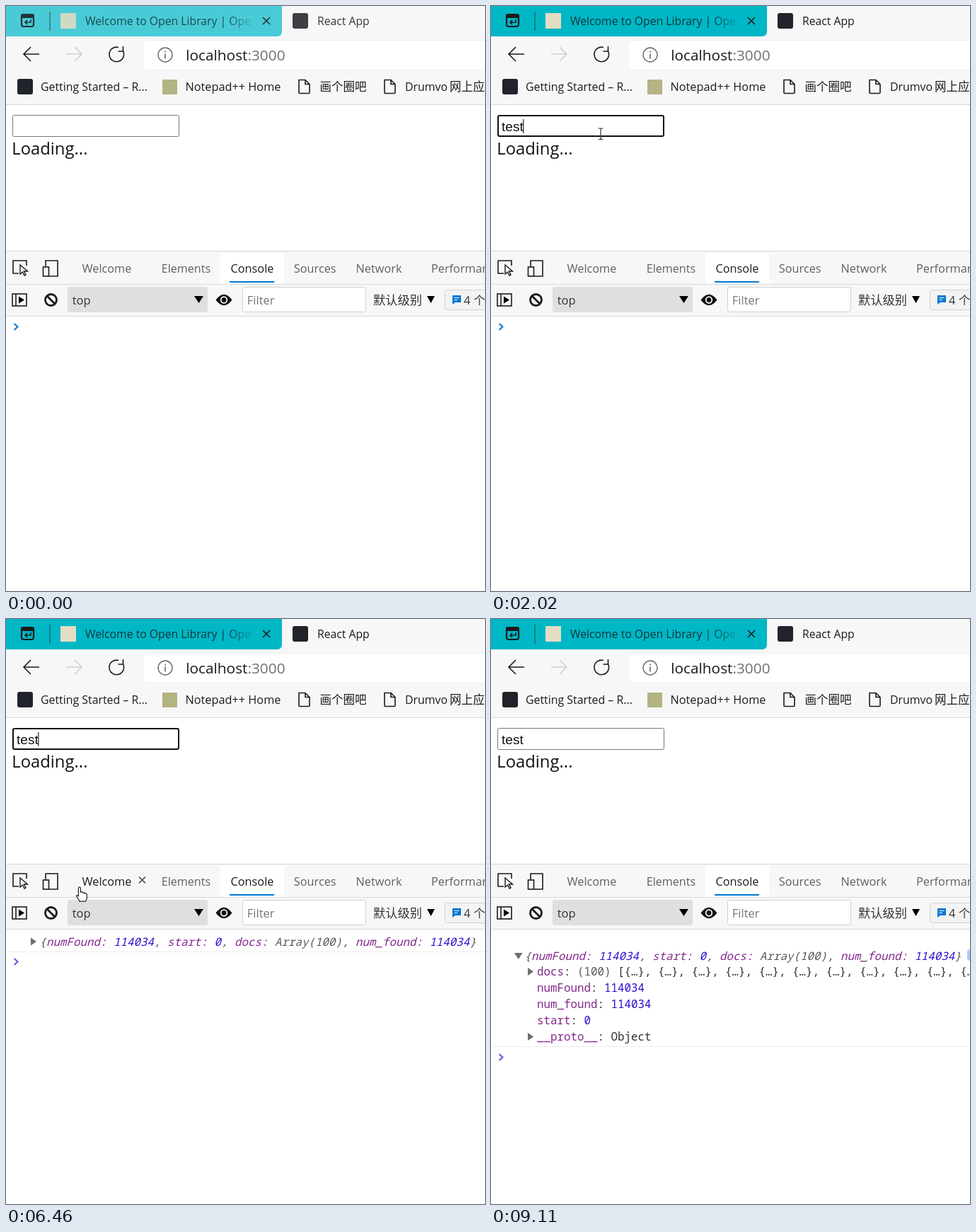
An HTML page for the animation above (9.88 s loop, 677 px wide and 827 px high).

```html
<!DOCTYPE html>
<html lang="en">
<head>
<meta charset="utf-8">
<title>Search box with console</title>
<style>
html, body { margin: 0; width: 100%; height: 100%; overflow: hidden; background: #fff; }
svg { display: block; width: 677px; height: 827px; }
text { font-family: "Open Sans", "Noto Sans CJK SC", "Noto Sans CJK", sans-serif; font-size: 16.3px; fill: #1b1b1b; white-space: pre; }
.cjk { font-family: "Noto Sans CJK SC", "Noto Sans CJK", sans-serif; }
.tab { font-size: 15.75px; }
.mark { font-size: 15.9px; }
.tool { fill: #5f5f5f; }
.code text { font-family: "Noto Sans Mono", "DejaVu Sans Mono", monospace; font-size: 15.84px; fill: #303030; }
.code .preview { font-style: italic; fill: #5a5a5a; }
.key { fill: #83268c; }
.num { fill: #2a10cf; }
.dim { fill: #5a5a5a; }
.line { fill: none; stroke: #1b1b1b; stroke-width: 1.6; }
.bold { stroke-width: 2.2; }
.heavy { stroke-width: 2.8; }
</style>
</head>
<body>
<svg viewBox="0 0 677 827">
  <defs>
    <linearGradient id="fade" gradientUnits="userSpaceOnUse" x1="312" y1="0" x2="353" y2="0">
      <stop offset="0" stop-color="#12343a"/>
      <stop offset="1" stop-color="#12343a" stop-opacity="0"/>
    </linearGradient>
    <clipPath id="titleClip"><rect x="100" width="248" height="43"/></clipPath>
    <path id="page" class="line" d="M1 1H10L16 7V19Q16 20 15 20H2Q1 20 1 19ZM10 1V7H16"/>
  </defs>

  <!-- browser frame -->
  <rect width="677" height="139" fill="#f7f7f7"/>
  <path id="strip" d="M0 0H390V36Q390 43 383 43H0Z"/>
  <g id="tabs">
    <rect class="line bold" x="22" y="12" width="17" height="17" rx="3"/>
    <path d="M21 17V14Q21 11 24 11H37Q40 11 40 14V17Z" fill="#1b1b1b"/>
    <path class="line" d="M35 19V23H27M30 20L27 23 30 26"/>
    <path d="M62 8V35" stroke="#1f5f66" stroke-width="1.3"/>
    <rect x="77" y="10" width="22" height="22" fill="#e4ddc3"/>
    <text class="tab" x="112" y="26.5" clip-path="url(#titleClip)" style="fill:url(#fade)">Welcome to Open Library | Open</text>
    <path class="line" d="M363 16L373 26M373 16L363 26"/>
    <rect x="405" y="10" width="22" height="22" rx="3" fill="#20232a"/>
    <text class="tab" x="440" y="26.5">React App</text>
  </g>
  <path class="line" d="M47 68H26M35 58L25 68 35 78"/>
  <path class="line" d="M85 68H106M97 58L107 68 97 78" style="stroke:#cfcfcf"/>
  <path class="line" d="M165 63A10.3 10.3 0 1 1 159 58.5M165.5 57V64H158.5"/>
  <rect x="193.5" y="48" width="500" height="43" rx="6" fill="#efefef"/>
  <rect x="194.5" y="49" width="500" height="41" rx="5" fill="#fff"/>
  <circle class="line" cx="225" cy="69" r="10" style="stroke:#666;stroke-width:1.4"/>
  <path d="M225 67.5V74.5M225 63.5V65.5" stroke="#666" stroke-width="1.6"/>
  <text x="254.3" y="77" style="font-size:20.8px">localhost<tspan fill="#707070">:3000</tspan></text>

  <rect x="16" y="103" width="22" height="22" rx="3" fill="#20232a"/>
  <text class="mark" x="49" y="120">Getting Started – R...</text>
  <rect x="221" y="104" width="21" height="21" fill="#b3b384"/>
  <text x="253.5" y="120">Notepad++ Home</text>
  <use href="#page" x="413" y="103.5"/>
  <text class="cjk" x="443.5" y="120" style="font-size:16.5px">画个圈吧</text>
  <use href="#page" x="534" y="103.5"/>
  <text class="mark" x="564" y="120">Drumvo</text>
  <text class="cjk" x="627" y="120" style="font-size:16.5px">网上应</text>
  <path d="M0 139.5H677" stroke="#d8d8d8"/>

  <!-- page -->
  <rect id="box" rx="2" fill="#fff"/>
  <text id="typed" x="15" y="176.5" style="font:19.1px 'Liberation Sans',sans-serif;fill:#111"></text>
  <rect id="caret" y="160" width="1.2" height="20" fill="#222"/>
  <text x="8.3" y="209.5" style="font-size:23.8px;fill:#111">Loading...</text>

  <!-- developer tools -->
  <rect y="346" width="677" height="92" fill="#f7f7f7"/>
  <rect x="303" y="349" width="90" height="44" fill="#fff"/>
  <path d="M0 346.5H677" stroke="#d5d5d5"/>
  <path d="M0 393.5H677M0 438.5H677" stroke="#dadada"/>
  <path class="line" d="M18 378H10V360H29V367"/>
  <path class="line" d="M20 366V379L23.5 376 26 381 28 380 25.5 375H30.5Z" style="stroke-width:1.4;fill:#f7f7f7"/>
  <path class="line" d="M56 368V360H73V382H61"/>
  <rect class="line" x="52.5" y="369" width="8" height="13"/>
  <text id="welcome" x="107.5" y="376.5">Welcome</text>
  <path id="shut" class="line" d="M188 364.5L197 373.5M197 364.5L188 373.5" style="stroke:#444"/>
  <text class="tool" x="219.8" y="376.5" style="font-size:16.1px">Elements</text>
  <text x="317.5" y="376.5">Console</text>
  <rect x="316" y="389" width="63" height="2" fill="#0078d4"/>
  <text class="tool" x="406.8" y="376.5">Sources</text>
  <text class="tool" x="494.6" y="376.5">Network</text>
  <text class="tool" x="601" y="376.5">Performance</text>

  <rect class="line" x="9" y="407" width="20" height="17"/>
  <path class="line" d="M14 407V424"/>
  <path d="M18 410.5L26 415.5 18 420.5Z"/>
  <circle class="line heavy" cx="63.5" cy="415.5" r="8"/>
  <path class="line heavy" d="M58 410L69 421"/>
  <rect x="87" y="397" width="198" height="36" rx="3" fill="#dfdfdf"/>
  <text x="93.8" y="421.5" style="font-size:16.5px;fill:#333">top</text>
  <path d="M266 410H279L272.5 420Z"/>
  <path d="M296.5 415.5Q308 400 319.5 415.5Q308 431 296.5 415.5Z" fill="#111"/>
  <circle cx="308" cy="415.5" r="4.3" fill="#111" stroke="#f7f7f7" stroke-width="1.8"/>
  <rect x="334.5" y="397.5" width="174" height="35" rx="3" fill="#fff" stroke="#cfcfcf"/>
  <text x="340.8" y="421.5" style="font-size:16.5px;fill:#757575">Filter</text>
  <text class="cjk" x="519" y="421.5" style="font-size:17.25px;fill:#333">默认级别</text>
  <path d="M595 410H606L600.5 420Z"/>
  <rect x="620.5" y="401.5" width="80" height="28" rx="3" fill="#f3f3f3" stroke="#d2d2d2"/>
  <path d="M631 409H643V419H635L631 422Z" fill="#0078d4"/>
  <path d="M633.5 412.5H640.5M633.5 415.5H638" stroke="#fff" stroke-width="1.2"/>
  <text x="647" y="421.5" style="fill:#333">4 <tspan class="cjk" x="661">个</tspan></text>

  <!-- console output -->
  <g class="code">
    <g id="result">
      <path id="closed" d="M35 450.5L43 456 35 461.5Z" fill="#6e6e6e"/>
      <path id="opened" d="M33 472H44.5L38.75 481Z" fill="#6e6e6e"/>
      <text id="preview" class="preview" x="47.5">{<tspan class="key">numFound:</tspan> <tspan class="num">114034</tspan>, <tspan class="key">start:</tspan> <tspan class="num">0</tspan>, <tspan class="key">docs:</tspan> Array(100), <tspan class="key">num_found:</tspan> <tspan class="num">114034</tspan>}</text>
      <path id="rule" stroke="#ececec" d="M0 0H677"/>
    </g>
    <g id="detail">
      <rect x="673" y="467" width="15" height="16" rx="4" fill="#b4c8f4"/>
      <path d="M52 493L60 498.5 52 504ZM52 585L60 590.5 52 596Z" fill="#6e6e6e"/>
      <text id="docs" x="65" y="504"><tspan class="key">docs</tspan>: <tspan class="dim">(100)</tspan> </text>
      <text x="65" y="527"><tspan class="key">numFound</tspan>: <tspan class="num">114034</tspan></text>
      <text x="65" y="550"><tspan class="key">num_found</tspan>: <tspan class="num">114034</tspan></text>
      <text x="65" y="573"><tspan class="key">start</tspan>: <tspan class="num">0</tspan></text>
      <text x="65" y="596"><tspan class="key">__proto__</tspan>: Object</text>
    </g>
  </g>
  <path id="prompt" fill="none" stroke-width="2" d="M11.5 -4.5L16.5 0 11.5 4.5"/>

  <g id="tip">
    <rect x="183" y="568" width="83.5" height="37" rx="3" opacity=".13"/>
    <rect x="182.5" y="566.5" width="82" height="36" rx="2" fill="#f4f4f4" stroke="#c6c6c6"/>
    <text x="196" y="591.5" style="fill:#505050">114034</text>
  </g>

  <!-- pointer -->
  <circle id="glow" r="10.5" fill="#fbf53a" opacity=".85"/>
  <g id="pointer">
    <path id="arrow" d="M0 0V15L3.3 12 5.7 18 8 17 5.7 11.3H10.3Z" fill="#fff" stroke="#222" stroke-width="1.1"/>
    <path id="beam" d="M-3.5 -7.5H-1Q0 -7.5 0 -6V6Q0 8 -1 8H-3.5M3.5 -7.5H1Q0 -7.5 0 -6M0 6Q0 8 1 8H3.5" fill="none" stroke="#333" stroke-width="1.2"/>
    <path id="hand" d="M-1.5 1Q0 -1.5 1.5 1V7Q4 5.5 4.8 8Q7 7 7.8 9Q10.5 8 10.5 11V15Q10 18 8.5 20H0Q-1 17 -4 13.5Q-5 10.5 -2 12L-1.5 12.5Z" fill="#fff" stroke="#222" stroke-width="1.2"/>
  </g>
</svg>

<script>
const LOOP = 9880, STEP = 78.3;
const $ = id => document.getElementById(id);
const show = (id, on) => { $(id).style.display = on ? "" : "none"; };
const set = (id, attrs) => { for (const k in attrs) $(id).setAttribute(k, attrs[k]); };

// time, text, caret x
const typing = [[0, "", 14.5], [1320, "t", 20], [1630, "te", 30.5], [1790, "tes", 40], [2020, "test", 45.2]];
const caretFlips = [770, 2570, 3110, 3670, 4200, 4670, 5210, 5750, 6300, 6840];
// time, pointer x, pointer y
const path = [
  [70, 641, 643], [290, 410, 390], [440, 200, 205], [539, 155, 180.5],
  [6222, 155, 180.5], [6456, 104, 379], [6700, 62, 438], [7000, 42, 458], [7160, 39, 460],
  [7472, 39, 460], [7862, 179, 552.5], [8210, 179, 552.5],
  [8470, 268, 560], [8700, 350, 620], [9110, 640, 830]
];
const moves = [[70, 540], [6300, 7240], [7550, 8480], [8550, 9110]];

$("docs").append("[" + "{…}, ".repeat(10) + "{…}, {…}]");

// Pointer positions are held between regular steps.
function pointerAt(t) {
  const [start, end] = moves.filter(m => m[0] <= t).pop() || moves[0];
  const q = start + Math.floor((Math.min(t, end) - start + 2) / STEP) * STEP;
  const i = Math.max(1, path.findIndex(p => p[0] > q));
  const [a, x0, y0] = path[i - 1], [b, x1, y1] = path[i];
  const k = Math.max(0, (q - a) / (b - a));
  return [x0 + (x1 - x0) * k, y0 + (y1 - y0) * k];
}

function drawBox(focus) {
  const w = focus ? 2 : 1;
  set("box", {
    x: 9 + w / 2, y: 154 + w / 2, width: 236 - w, height: 31 - w,
    stroke: focus ? "#101010" : "#767676", "stroke-width": w
  });
}

function draw(t) {
  const active = t >= 770, focus = active && t < 7160;
  const logged = t >= 5920, open = t >= 7320;

  set("strip", { fill: active ? "#00b7c5" : "#49cbd7" });
  $("tabs").style.opacity = active ? 1 : 0.86;
  drawBox(focus);

  const [, word, caretX] = typing.filter(s => s[0] <= t).pop();
  $("typed").textContent = word;
  set("caret", { x: caretX });
  show("caret", focus && caretFlips.filter(f => f <= t).length % 2);

  show("result", logged);
  show("detail", open);
  show("closed", !open);
  show("opened", open);
  set("preview", { y: open ? 481.5 : 461.5 });
  set("rule", { transform: `translate(0 ${open ? 604.5 : 470.5})` });
  set("prompt", {
    transform: `translate(0 ${open ? 619.5 : logged ? 484.5 : 453.5})`,
    stroke: logged ? "#5f55dc" : "#0078d4"
  });
  show("tip", t >= 8010 && t < 8250);

  const [x, y] = pointerAt(t);
  const onBox = x > 9 && x < 245 && y > 154 && y < 186;
  const onTab = x > 92 && x < 205 && y > 348 && y < 393;
  set("pointer", { transform: `translate(${x} ${y})` });
  show("pointer", t >= 70 && t < 9110);
  show("beam", onBox);
  show("hand", onTab);
  show("arrow", !onBox && !onTab);
  show("shut", onTab);
  $("welcome").style.fill = onTab ? "#1b1b1b" : "#5f5f5f";
  set("glow", { cx: x - 2, cy: y });
  show("glow", (t >= 770 && t < 930) || (t >= 7160 && t < 7320));
}

const began = performance.now();
function tick() {
  draw((performance.now() - began) % LOOP);
  requestAnimationFrame(tick);
}
tick();
</script>
</body>
</html>
```
